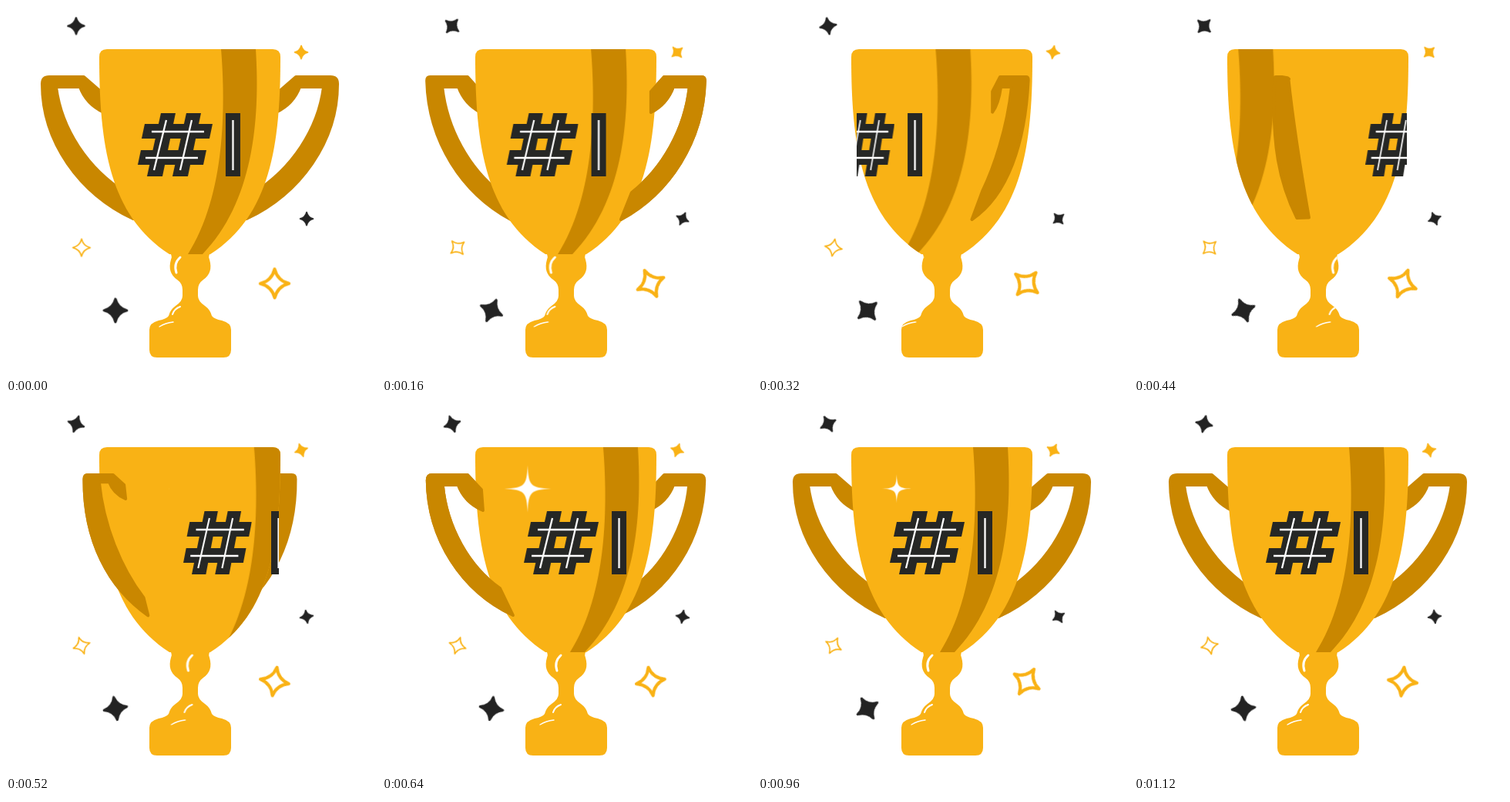
An HTML page without scripts that plays this animation: 480x480 px, repeating every 1160 ms.

```html
<!DOCTYPE html>
<html lang="en">
<head>
<meta charset="utf-8">
<title>Number one trophy</title>
<style>
  html, body { margin: 0; width: 100%; height: 100%; overflow: hidden; background: #fff; }
  svg { display: block; width: 100vw; height: 100vh; }

  :root { --gold: #f9b215; --dark: #c98700; --ink: #232323; }
  .gold { fill: var(--gold); }
  .dark { fill: var(--dark); }

  .handle, .front, .label, .hash, .stripe-out, .stripe-in, .gloss, .glint, .spin, .turn, .back {
    animation: 1160ms linear infinite;
  }

  /* stars */
  .spin { animation-name: spin; }
  .turn { animation-name: turn; }
  .back { animation-name: spin; animation-direction: reverse; }
  .slow { animation-name: turn; animation-direction: reverse; }
  @keyframes spin { to { transform: rotate(360deg); } }
  @keyframes turn { to { transform: rotate(180deg); } }
  .star { vector-effect: non-scaling-stroke; stroke-linejoin: round; stroke-width: 2.2; }
  .ink { fill: var(--ink); stroke: var(--ink); }
  .sun { fill: var(--gold); stroke: var(--gold); }
  .line { fill: #fff; stroke: var(--gold); }
  .thin { stroke-width: 1.6; }

  /* lettering leaves left, returns from the right */
  .label { animation-name: label; }
  @keyframes label {
    0% { transform: none; animation-timing-function: cubic-bezier(.333, .06, .667, -.06); }
    34.48% { transform: translateX(-182px); }
    34.49% { transform: translateX(182px); animation-timing-function: cubic-bezier(.333, 1.06, .667, .94); }
    68.97%, 100% { transform: none; }
  }
  /* the wide sign narrows towards the rim */
  .hash { animation-name: hash; }
  @keyframes hash {
    0% { transform-origin: 268px 0; transform: none; animation-timing-function: cubic-bezier(.333, 0, .667, .1); }
    27.59% { transform-origin: 268px 0; transform: scaleX(.74); }
    34.48% { transform-origin: 268px 0; transform: scaleX(.6); }
    34.49% { transform-origin: 171px 0; transform: scaleX(.6); }
    37.93% { transform-origin: 171px 0; transform: scaleX(.75); animation-timing-function: cubic-bezier(.333, .7, .667, 1); }
    55.17%, 68.96% { transform-origin: 171px 0; transform: none; }
    68.97%, 100% { transform-origin: 268px 0; transform: none; }
  }

  .stripe-out { animation-name: stripe-out; }
  @keyframes stripe-out {
    0% { transform: none; animation-timing-function: cubic-bezier(.333, 0, .667, .1); }
    27.59% { transform: translateX(-48px); animation-timing-function: cubic-bezier(.333, .25, .667, .6); }
    37.93% { transform: translateX(-142px); }
    44%, 100% { transform: translateX(-260px); }
  }
  .stripe-in { animation-name: stripe-in; }
  @keyframes stripe-in {
    0%, 37.93% { transform: translateX(92px); animation-timing-function: cubic-bezier(.333, 1, .667, 1); }
    68.97%, 100% { transform: none; }
  }

  .gloss { animation-name: gloss; fill: none; stroke: #fff; stroke-linecap: round; }
  @keyframes gloss {
    0% { transform: none; animation-timing-function: cubic-bezier(.333, 0, .667, 0); }
    34.48% { transform: translateX(-24px); }
    34.49% { transform: translateX(54px); }
    37.93% { transform: translateX(38px); animation-timing-function: cubic-bezier(.333, .8, .667, 1); }
    55.17% { transform: translateX(6px); }
    68.97%, 100% { transform: none; }
  }

  .glint { animation-name: glint; }
  @keyframes glint {
    0%, 44.8% { transform: translate(212px, 110px) scale(0); animation-timing-function: ease-out; }
    55.17% { transform: translate(189px, 110px) scale(.78); animation-timing-function: ease-out; }
    68.97% { transform: translate(180px, 110px) scale(1); animation-timing-function: ease-in; }
    89.6%, 100% { transform: translate(180px, 110px) scale(0); }
  }

  /* one handle sweeps across the front, its mirror across the back */
  .handle {
    animation-name: handle;
    fill: var(--dark); stroke: var(--dark); stroke-width: 4; stroke-linejoin: round;
  }
  @keyframes handle {
    0% {
      d: path("M353 112L376 92L421 92Q430 92 430 101C430 176 382 243 312 276L322 242C371 211 405 160 412 105L381 105Q373 127 350 138Z");
      animation-timing-function: cubic-bezier(.333, 0, .667, 0);
    }
    13.79% {
      d: path("M349 111L366 92L415 92Q419 92 419 97C417 176 373 243 310 277L324 242C364 211 393 160 399 105L378 105Q370 127 349 138Z");
      animation-timing-function: cubic-bezier(.333, .143, .667, .43);
    }
    27.59% {
      d: path("M305 111L315 92L349 92Q352 92 352 96C348 178 325 246 278 277L292 239C306 211 324 160 330 105L316 105Q313 127 305 138Z");
    }
    37.93% {
      d: path("M200 93L193 92L186 92Q184 92 184 94C180 180 190 230 212 275L228 275C218 215 208 150 202 94L202 94Q202 94 202 94Z");
      animation-timing-function: cubic-bezier(.2, .55, .6, .93);
    }
    55.17% {
      d: path("M129 111L111 92L65 92Q59 92 59 99C60 176 104 243 170 274L153 239C113 211 84 160 79 105L99 105Q107 127 131 138Z");
      animation-timing-function: cubic-bezier(.333, 1, .667, 1);
    }
    68.97%, 100% {
      d: path("M124 112L101 92L56 92Q47 92 47 101C47 176 95 243 165 276L155 242C106 211 72 160 65 105L96 105Q104 127 127 138Z");
    }
  }
  .front { animation-name: front; animation-timing-function: step-end; }
  @keyframes front {
    0% { opacity: 0; }
    3% { opacity: 1; }
    67.5%, 100% { opacity: 0; }
  }
</style>
</head>
<body>
<svg viewBox="0 0 480 480" role="img" aria-label="Trophy marked #1">
  <defs>
    <path id="star" d="M0-10Q2-2 10 0Q2 2 0 10Q-2 2-10 0Q-2-2 0-10Z"/>
    <path id="cup" d="M121 66Q121 56 131 56H346Q356 56 356 66C356 180 343 272 265 322H212C134 272 121 180 121 66Z"/>
    <path id="half" d="M240 318H210Q217 323 214 329Q209 346 222 355Q229 360 229 368V376Q229 383 220 389Q213 394 211 402Q208 406 198 408Q186 411 186 420V446Q186 456 196 456H240Z"/>
    <path id="stripe" d="M279 56C285 130 285 245 236 322H255C320 255 330 150 324 56Z"/>
    <clipPath id="in-cup"><use href="#cup"/></clipPath>
    <clipPath id="in-foot">
      <use href="#half"/>
      <use href="#half" transform="matrix(-1 0 0 1 478 0)"/>
    </clipPath>
    <clipPath id="in-label"><rect x="128" y="130" width="226" height="100"/></clipPath>
  </defs>

  <!-- handles behind the cup -->
  <path class="handle"/>
  <g transform="matrix(-1 0 0 1 477 0)"><path class="handle"/></g>

  <!-- foot -->
  <g class="gold">
    <use href="#half"/>
    <use href="#half" transform="matrix(-1 0 0 1 478 0)"/>
  </g>
  <g clip-path="url(#in-foot)">
    <g class="gloss">
      <path d="M226 326Q217 334 221 346" stroke-width="3"/>
      <path d="M216 400Q218 393 226 390" stroke-width="2"/>
      <path d="M199 416Q207 411 217 410" stroke-width="1.4"/>
    </g>
  </g>

  <!-- cup -->
  <use href="#cup" class="gold"/>
  <g clip-path="url(#in-cup)" class="dark">
    <g class="stripe-out"><use href="#stripe"/></g>
    <g class="stripe-in"><use href="#stripe"/></g>
  </g>
  <g class="front"><path class="handle"/></g>

  <!-- lettering -->
  <g clip-path="url(#in-label)">
    <g class="label" fill="#262725">
      <g class="hash">
        <path d="M201 139H220L203 221H183ZM234 139H253L236 221H216ZM180 153H268L264 172H176ZM175 187H260L256 206H171Z"/>
        <path fill="none" stroke="#fff" stroke-width="2.3" d="M208 148L192 213M241 148L226 213M189 163H257M181 197H249"/>
      </g>
      <path d="M285 139H304V221H285Z"/>
      <path stroke="#fff" stroke-width="2.3" d="M294.5 148V213"/>
    </g>
  </g>

  <g class="glint">
    <path fill="#fff" d="M0-39C1.5-5 5-1.5 39 0C5 1.5 1.5 5 0 39C-1.5 5-5 1.5-39 0C-5-1.5-1.5-5 0-39Z"/>
  </g>

  <!-- stars -->
  <g transform="translate(91 26)"><g class="back"><use href="#star" class="star ink" transform="scale(1.06)"/></g></g>
  <g transform="translate(383 60)"><g class="spin"><use href="#star" class="star sun" transform="scale(.84)"/></g></g>
  <g transform="translate(390 276)"><g class="turn"><use href="#star" class="star ink" transform="scale(.84)"/></g></g>
  <g transform="translate(98 313.5)"><g class="spin"><use href="#star" class="star line thin" transform="scale(1.12)"/></g></g>
  <g transform="translate(348.5 360)"><g class="turn slow"><use href="#star" class="star line" transform="scale(1.86)"/></g></g>
  <g transform="translate(142 395)"><g class="turn"><use href="#star" class="star ink" transform="scale(1.48)"/></g></g>
</svg>
</body>
</html>
```
